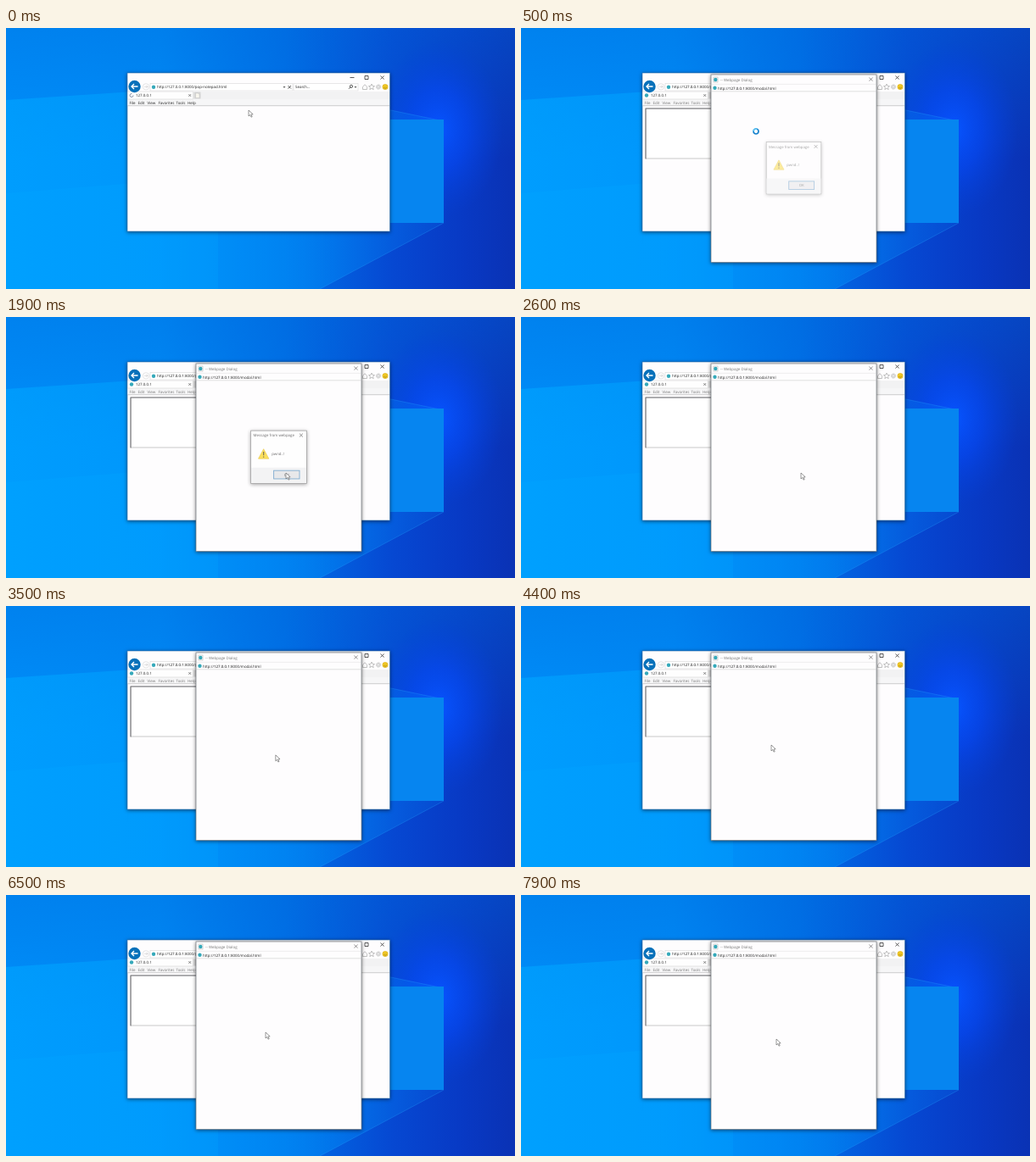
These frames come from a looping animation (600x308 px, 8 s). An HTML page:

```html
<!DOCTYPE html>
<html lang="en">
<head>
<meta charset="utf-8">
<title>Pop-up dialog</title>
<style>
html, body { margin: 0; width: 100%; height: 100%; overflow: hidden; background: #0078e8; }
svg { display: block; width: 600px; height: 308px; }
text { font: 4.45px "Open Sans", "Noto Sans", sans-serif; fill: #222; text-rendering: geometricPrecision; white-space: pre; }
.grey text, text.grey { fill: #777; }
.line { fill: none; stroke: #333; stroke-width: .8; }
.pale { fill: none; stroke: #aaa; stroke-width: .7; }
.window { filter: drop-shadow(0 1px 2px #0008); }
</style>
</head>
<body>
<svg viewBox="0 0 600 308">
  <defs>
    <linearGradient id="sky">
      <stop offset="0" stop-color="#0090fb"/>
      <stop offset=".3" stop-color="#008cf8"/>
      <stop offset=".55" stop-color="#0070e8"/>
      <stop offset=".76" stop-color="#0648d2"/>
      <stop offset=".9" stop-color="#0839c4"/>
      <stop offset="1" stop-color="#0a32b4"/>
    </linearGradient>
    <radialGradient id="halo">
      <stop offset="0" stop-color="#0754ff"/>
      <stop offset=".45" stop-color="#0648f0" stop-opacity=".7"/>
      <stop offset="1" stop-color="#0640d8" stop-opacity="0"/>
    </radialGradient>
    <linearGradient id="beam">
      <stop offset="0" stop-color="#00a4ff" stop-opacity=".65"/>
      <stop offset=".7" stop-color="#009cff" stop-opacity=".4"/>
      <stop offset="1" stop-color="#0090ff" stop-opacity=".15"/>
    </linearGradient>
    <linearGradient id="shade" x2="0" y2="1">
      <stop offset="0" stop-color="#0068d8" stop-opacity=".35"/>
      <stop offset=".5" stop-color="#0068d8" stop-opacity="0"/>
    </linearGradient>
    <g id="close"><path class="line" d="M-2-2 2 2M2-2-2 2"/></g>
    <circle id="badge" r="2.2" fill="#35a9ba"/>
  </defs>

  <!-- desktop -->
  <rect width="600" height="308" fill="url(#sky)"/>
  <rect width="600" height="308" fill="url(#shade)"/>
  <ellipse cx="510" cy="120" rx="76" ry="105" fill="url(#halo)"/>
  <path d="M0 85 300 65 516 110V230L370 308H0Z" fill="url(#beam)"/>
  <path d="M0 195 250 175V308H0Z" fill="#00a8ff" opacity=".22"/>
  <path d="M300 65 516 110M370 308 516 230" fill="none" stroke="#29a8ff" stroke-width=".7" opacity=".4"/>
  <rect x="394" y="108" width="122" height="122" fill="#0685f0"/>

  <!-- browser -->
  <g class="window">
    <rect x="143" y="53" width="309.5" height="187" fill="#fefdfe" stroke="#356fa8" stroke-width=".6"/>
  </g>
  <path class="line" d="M405.500 58.500h5M423 56.500h4v4h-4z"/>
  <use href="#close" x="443.500" y="58.500"/>
  <rect x="143.500" y="75" width="308.500" height="9" fill="#f2f2f3"/>
  <rect x="143.500" y="84" width="308.500" height="7.500" fill="#f6f6f7"/>
  <path class="pale" d="M143.500 91.700h308.500" stroke-opacity=".8"/>
  <rect x="143.500" y="75" width="77" height="9" fill="#fefefe" stroke="#ccc" stroke-width=".5"/>
  <rect x="170" y="65.500" width="168" height="8.500" fill="#fff" stroke="#d2d2d2" stroke-width=".5"/>
  <rect x="339" y="65.500" width="76" height="8.500" fill="#fff" stroke="#d2d2d2" stroke-width=".5"/>
  <circle cx="151.500" cy="69" r="7.200" fill="#0871ba"/>
  <path d="M155.500 69h-7.500m3-3-3 3 3 3" fill="none" stroke="#fff" stroke-width="1.400"/>
  <circle class="pale" cx="165" cy="69.300" r="3.700" stroke-opacity=".4"/>
  <path class="pale" d="M163 69.300h4m-1.500-1.500 1.500 1.500-1.500 1.500" stroke-opacity=".6"/>
  <use href="#badge" x="174" y="69.800"/>
  <text x="178" y="71.400" id="address"></text>
  <path d="M326.500 69h3l-1.500 1.800zM410.500 69h3l-1.500 1.800z" fill="#555"/>
  <path class="line" d="m332.500 68 3.500 3.500m0-3.500-3.500 3.500M404 71.800l2-2"/>
  <circle class="line" cx="407" cy="68.800" r="1.600"/>
  <text x="341" y="71.400">Search...</text>
  <path class="pale" d="M420.500 69.500l2.500-2.800 2.500 2.800v3h-5zM431 66l1 2.400 2.500.2-1.900 1.600.6 2.500-2.200-1.400-2.200 1.400.6-2.500-1.900-1.600 2.500-.2z"/>
  <circle class="pale" cx="439" cy="69.500" r="2.600" stroke-width="1.200" stroke-dasharray="1.400 .6"/>
  <circle class="pale" cx="439" cy="69.500" r="1.500"/>
  <circle cx="447" cy="69.500" r="3.200" fill="#f8cf27" stroke="#c89a16" stroke-width=".4"/>
  <path d="M445.700 68.700h.7m1.300 0h.7M445.300 70.400q1.700 1.700 3.400 0" fill="none" stroke="#765b12" stroke-width=".6"/>
  <g id="loading"><circle cx="148" cy="79.500" r="2" fill="none" stroke="#8994aa" stroke-dasharray="9 3.500"/></g>
  <use href="#badge" id="loaded" x="148" y="79.500"/>
  <text x="153" y="81.200">127.0.0.1</text>
  <use href="#close" transform="translate(216.700 79.500) scale(.7)"/>
  <rect x="221.500" y="75.500" width="8" height="8" fill="#d5d5d5"/>
  <path d="M223.500 77h3l1.500 1.500v4h-4.500z" fill="#f8f6ee" stroke="#bbb" stroke-width=".4"/>
  <g id="menu"></g>

  <!-- framed page and its modal window -->
  <g id="modal">
    <path d="M300 154H147V95h153" fill="#fff" stroke="#c9c9c9"/>
    <path d="M147 154.500V95h153" fill="none" stroke="#77777b" stroke-width="1.100"/>
    <g class="window">
      <rect x="224" y="55" width="195" height="221.500" fill="#fefdfe" stroke="#777b82" stroke-width=".7"/>
    </g>
    <rect x="227" y="58" width="5" height="6" fill="#fff" stroke="#aaa" stroke-width=".5"/>
    <use href="#badge" x="229.300" y="61"/>
    <text class="grey" x="235" y="62.600">-- Webpage Dialog</text>
    <use href="#close" x="412.500" y="60.500" opacity=".65"/>
    <use href="#badge" x="228.500" y="70.800"/>
    <text x="232" y="72.600">http://<tspan fill="#000">127.0.0.1</tspan>:8000/modal.html</text>
    <path class="pale" d="M224.500 74.800h194" stroke-opacity=".5"/>
    <path class="pale" d="M224.500 66.300h194" stroke-opacity=".3"/>
  </g>

  <g id="alert">
    <g class="window">
      <rect x="288" y="133.500" width="67" height="63.500" fill="#fff" stroke="#666" stroke-width=".7"/>
    </g>
    <rect x="288.400" y="178" width="66.200" height="18.600" fill="#efeff0"/>
    <text x="291" y="141">Message from webpage</text>
    <use href="#close" x="348.500" y="139"/>
    <path d="m303.300 155.500 6.300 11.700h-12.600z" fill="#fbd20b" stroke="#e0b300" stroke-width=".7" stroke-linejoin="round"/>
    <path d="M303.300 159v4.200m0 1.300v1.300" stroke="#3a2d00" stroke-width="1.200"/>
    <text x="313" y="163">pwnd..!</text>
    <rect x="315.500" y="181.500" width="31" height="10" fill="#dedfe1" stroke="#3e82b8" stroke-width=".9"/>
    <text x="331" y="188.200" text-anchor="middle">OK</text>
  </g>

  <g id="arrow">
    <path d="M0 0v7l1.700-1.500 1.300 2.700 1.200-.6-1.300-2.600 2.300-.2z" fill="#fff" stroke="#555" stroke-width=".6" stroke-linejoin="round"/>
  </g>
  <g id="busy" fill="none" stroke-width="1.700">
    <circle r="3" stroke="#1681cc"/>
    <circle r="3" stroke="#65c8f5" stroke-dasharray="6 12.850"/>
  </g>
</svg>
<script>
const LOOP = 8000, STEP = 100;
const $ = id => document.getElementById(id);
const show = (id, on) => $(id).style.display = on ? "" : "none";
const clamp = v => Math.max(0, Math.min(1, v));

// time, x, y of the pointer tip
const path = [
  [0, 286, 97], [200, 286, 97], [500, 277, 122], [700, 280, 127],
  [1200, 325, 181], [1400, 327, 182], [1900, 330, 184], [2600, 330, 184],
  [3300, 320, 177], [4400, 295, 164], [5400, 301, 165], [6500, 306, 162],
  [7200, 303, 167], [7900, 301, 170]
];

const menu = [["File", 145.5], ["Edit", 155.5], ["View", 166.5], ["Favorites", 179.5], ["Tools", 200.5], ["Help", 214]];
$("menu").innerHTML = menu.map(([name, x]) => `<text x="${x}" y="89.600">${name}</text>`).join("");

function pointer(t) {
  const i = path.findIndex(p => p[0] > t);
  if (i < 0) return path.at(-1).slice(1);
  const [t0, x0, y0] = path[i - 1], [t1, x1, y1] = path[i];
  const u = (t - t0) / (t1 - t0), k = u * u * (3 - 2 * u);
  return [x0 + (x1 - x0) * k, y0 + (y1 - y0) * k];
}

function draw(t) {
  const open = t >= 300, busy = t >= 300 && t < 700;
  show("modal", open);
  show("loaded", open);
  show("loading", !open);
  $("address").innerHTML = `http://<tspan fill="${open ? "#000" : "#222"}">127.0.0.1</tspan>:8000/pop-notepad.html`;
  $("menu").setAttribute("class", open ? "grey" : "");
  $("loading").setAttribute("transform", `rotate(${t * .36} 148 79.5)`);

  const fade = t < 1000 ? clamp((t - 420) / 200) : clamp((2000 - t) / 150);
  const scale = .94 + .06 * fade;
  show("alert", fade > 0);
  $("alert").style.opacity = fade;
  $("alert").setAttribute("transform", `translate(321.5 165.2) scale(${scale}) translate(-321.5 -165.2)`);

  const [x, y] = pointer(t);
  show("arrow", !busy);
  show("busy", busy);
  $("arrow").setAttribute("transform", `translate(${x} ${y})`);
  $("busy").setAttribute("transform", `translate(${x} ${y}) rotate(${t * .36})`);
}

function tick() {
  draw(Math.floor(performance.now() % LOOP / STEP) * STEP);
  requestAnimationFrame(tick);
}
tick();
</script>
</body>
</html>
```
